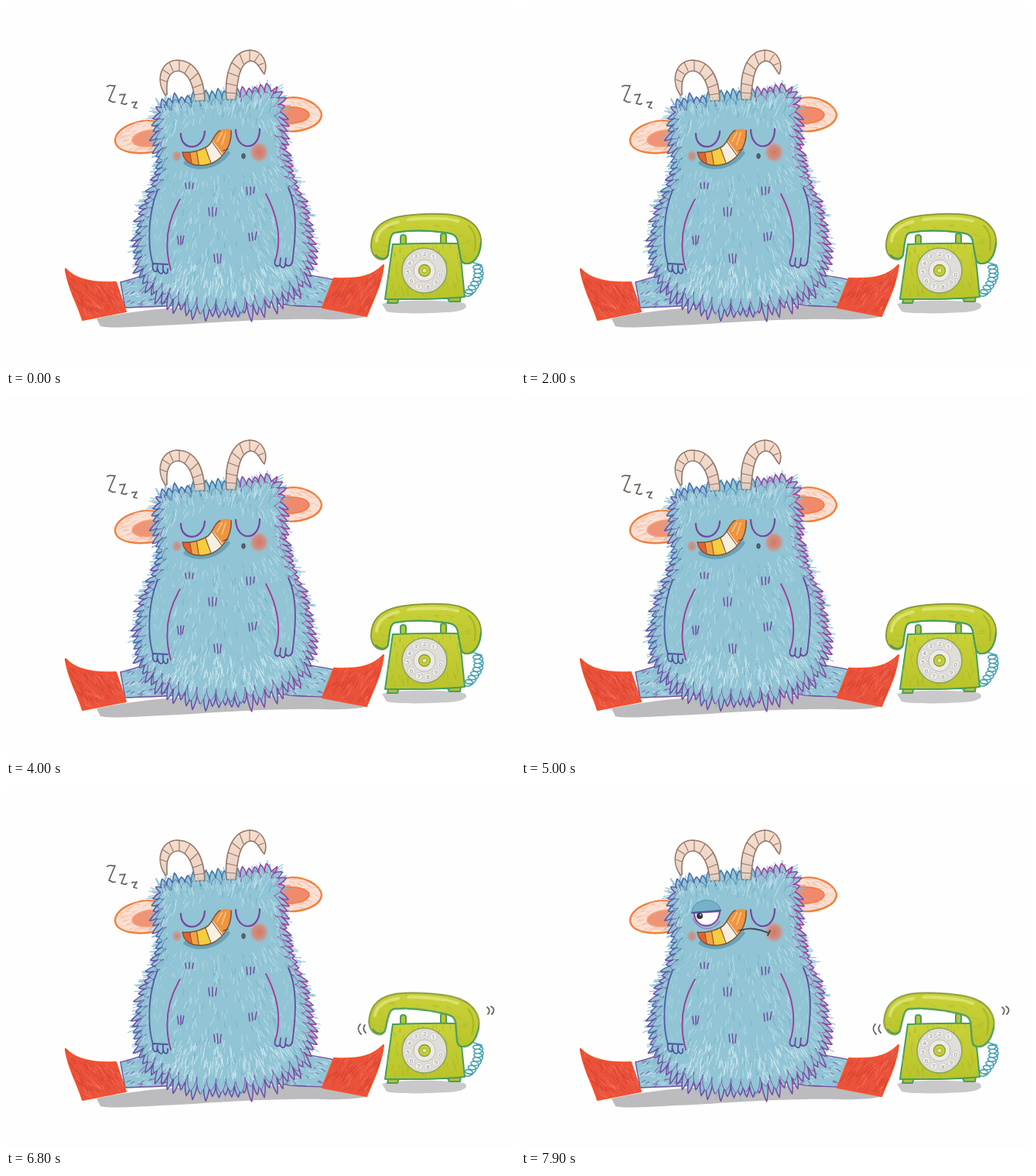
Recreate the animation shown at these times as an HTML page. Size 658 px wide and 468 px high, loop 8 s.

```html
<!DOCTYPE html>
<html lang="en">
<head>
<meta charset="utf-8">
<title>Sleepy monster</title>
<style>
html, body { margin: 0; width: 100%; height: 100%; overflow: hidden; background: #fefefe; }
svg { display: block; width: 100vw; height: 100vh; }
path { stroke-linecap: round; stroke-linejoin: round; }
.line { fill: none; }
.sleep, .ring, .handset, .rightShut, .rightOpen, .leftShut, .leftOpen, .dot, .gasp, .grimace {
  animation: 8s step-end infinite;
}
.sleep { animation-name: sleep; }
.ring { animation-name: ring; }
.handset { animation-name: shake; transform-origin: 543px 300px; }
.rightShut { animation-name: rightShut; }
.rightOpen, .gasp { animation-name: rightOpen; }
.leftShut { animation-name: leftShut; }
.leftOpen, .grimace { animation-name: leftOpen; }
.dot { animation-name: dot; }
@keyframes sleep { 0% { opacity: 1 } 88.75%, 100% { opacity: 0 } }
@keyframes ring { 0% { opacity: 0 } 80%, 100% { opacity: 1 } }
@keyframes shake {
  0%, 88.75%, 93.75%, 97.5% { transform: none }
  85%, 91.25%, 96.25%, 98.75%, 100% { transform: translate(-2px, -1px) rotate(5.5deg) }
}
@keyframes rightShut { 0%, 96.25%, 100% { opacity: 1 } 91.25% { opacity: 0 } }
@keyframes rightOpen { 0%, 96.25%, 100% { opacity: 0 } 91.25% { opacity: 1 } }
@keyframes leftShut { 0% { opacity: 1 } 96.25%, 100% { opacity: 0 } }
@keyframes leftOpen { 0% { opacity: 0 } 96.25%, 100% { opacity: 1 } }
@keyframes dot { 0% { opacity: 1 } 91.25%, 100% { opacity: 0 } }
</style>
</head>
<body>
<svg id="art" viewBox="0 0 658 468">
  <defs>
    <radialGradient id="blush">
      <stop offset="0" stop-color="#d9745f"/>
      <stop offset=".65" stop-color="#d48a7b" stop-opacity=".85"/>
      <stop offset="1" stop-color="#c9a5a0" stop-opacity="0"/>
    </radialGradient>
    <linearGradient id="horn" x2="0" y2="1">
      <stop offset="0" stop-color="#f6ddcd"/>
      <stop offset="1" stop-color="#e6cfc2"/>
    </linearGradient>
    <linearGradient id="lime" x2="0" y2="1">
      <stop offset="0" stop-color="#c9d238"/>
      <stop offset="1" stop-color="#b9c42b"/>
    </linearGradient>
    <clipPath id="noseClip"><use href="#nose"/></clipPath>
  </defs>

  <path fill="#bcbcbe" d="M117 404C150 397 190 391 240 389L400 387 468 401C440 408 400 404 370 405 300 406 250 411 200 413 165 415 135 417 122 414Z"/>
  <path fill="#c9c9cb" d="M486 385C510 379 570 380 592 384 600 389 592 395 570 396 540 398 505 398 492 395Z"/>

  <g stroke="#75509f" stroke-width="1.4" fill="#91c4d4">
    <path id="legL" d="M148 357C165 352 185 348 203 335L228 386C200 389 175 389 154 390Z"/>
    <path id="legR" d="M358 340C380 348 400 348 424 354L410 389C385 388 360 388 338 382Z"/>
  </g>
  <g fill="#ea523c" stroke="#f5512a" stroke-width="2.2">
    <path id="bootL" d="M77 340C88 352 107 359 142 357L155 395 99 406C93 385 80 365 77 340Z"/>
    <path id="bootR" d="M488 335C475 348 460 354 424 352L409 390 466 401C474 380 485 362 488 335Z"/>
  </g>

  <g stroke="#f0803c" stroke-width="2.4">
    <path id="earL" fill="#fae0d3" d="M193 149C172 145 142 157 141 174 142 189 170 194 196 187Z"/>
    <path id="earR" fill="#fae0d3" d="M355 121C380 112 407 127 408 141 406 157 378 165 357 161Z"/>
    <path fill="#f09478" stroke="#f2a47f" stroke-width="1.5" d="M192 160C178 160 163 166 163 174 165 182 180 183 194 181Z"/>
    <path fill="#f08a6a" stroke="#f07c48" stroke-width="1.8" d="M356 131C372 129 391 132 392 141 390 150 372 153 357 152Z"/>
  </g>

  <path id="body" fill="#91c4d4" d="M200 130C225 121 300 120 345 108C356 122 356 150 355 172C358 200 372 225 380 250C390 280 396 315 390 338C380 368 330 387 275 387C225 387 185 365 175 338C170 310 172 280 182 255C196 225 204 205 199 180C193 160 196 140 200 130Z"/>
  <g id="fur"></g>

  <g fill="url(#horn)" stroke="#94786a" stroke-width="1.6">
    <path d="M257 122C256 95 247 71 222 70 201 70 192 95 206 115 209 116 208 113 208 110 207 93 213 83 224 84 237 87 243 105 244 123Z"/>
    <path d="M285 121C282 90 290 58 316 57 333 58 339 75 334 88 329 84 326 71 316 71 300 74 299 102 297 121Z"/>
    <path class="line" stroke-width="1.1" d="M200 95l8 3M202 82l9 6M211 73l5 11M224 70l0 14M238 75l-7 12M248 87l-10 9M254 101l-13 5M256 113l-13 2M333 74l-8 3M327 63l-6 9M315 57l0 14M302 62l5 13M292 73l11 9M287 86l13 5M285 100l13 3M285 112l13 1"/>
  </g>
  <path class="line" stroke="#9fd0df" stroke-width="1.4" d="M243 127l1 -8M248 127l0 -9M253 127l1 -8M258 126l2 -9M284 125l-1 -8M289 125l1 -9M294 125l1 -8M299 124l1 -7"/>

  <g class="line" stroke-width="1.8">
    <path fill="#91c4d4" stroke="none" d="M196 238C184 270 184 310 190 340L213 345C207 310 210 280 224 250Z"/>
    <path fill="#91c4d4" stroke="none" d="M336 243C352 280 355 310 348 335L369 337C374 310 378 270 366 237Z"/>
    <g id="armFur"></g>
    <path stroke="#4f5aa3" d="M196 238C183 270 183 310 190 334"/>
    <path stroke="#9a3a97" d="M225 250C207 280 205 312 213 341"/>
    <path stroke="#a83596" d="M336 243C353 275 356 305 348 329"/>
    <path stroke="#6a48a0" d="M365 235C379 265 373 310 370 332"/>
    <path stroke="#51519c" d="M190 333C188 340 192 345 195 343L196 334M196 340C198 348 203 347 203 342V334M203 341C205 348 210 347 209 340M190 333L209 334"/>
    <path stroke="#6d479c" d="M348 328C346 335 350 338 354 335L355 326M354 334C356 340 361 339 361 334L362 326M361 333C364 338 369 336 370 331"/>
    <path stroke="#734a9e" stroke-width="1.5" d="M232 229l1 7M237 228l0 8M242 229l-1 7M311 234l1 10M316 234l0 10M321 234l-1 8M262 261l1 10M267 260l0 12M272 261l-1 10M222 298l1 10M226 297l0 12M230 297l-2 10M314 294l1 10M318 293l1 10M324 292l-2 10M269 321l1 10M273 320l1 13M278 321l-1 11"/>
  </g>

  <ellipse cx="327" cy="189" rx="13" ry="14" fill="url(#blush)"/>
  <ellipse cx="221" cy="194" rx="7" ry="8" fill="url(#blush)" opacity=".75"/>
  <path class="line" stroke="#5b95ad" stroke-width="5" opacity=".7" d="M232 203C250 214 275 207 287 190"/>
  <path id="nose" fill="#ef9440" d="M228 189C237 190 250 188 261 181 268 175 270 163 277 161 282 158 289 158 291 161 292 178 284 194 267 203 250 209 231 207 228 189Z"/>
  <g clip-path="url(#noseClip)">
    <path fill="#e8602e" d="M224 184H238L241 210H226Z"/>
    <path fill="#f2a33c" d="M237 184L246 186 250 212 240 210Z"/>
    <path fill="#f6cd3e" d="M246 184L257 180 266 208 249 211Z"/>
    <path fill="#f7efe0" d="M257 179L267 174 282 194 265 208Z"/>
    <path class="line" stroke="#8c5736" stroke-width="1.2" d="M237 186L241 208M246 185L250 210M257 181L266 206M266 175L281 196"/>
    <path class="line" stroke="#f7bd79" stroke-width="2" d="M279 164L273 175M284 164L279 179"/>
  </g>
  <path class="line" stroke="#7a5138" stroke-width="1.5" d="M228 189C237 190 250 188 261 181 268 175 270 163 277 161M228 189C231 207 250 209 267 203 284 194 292 178 291 161"/>
  <path class="line" stroke="#4c4750" stroke-width="1.3" d="M281 187L287 185"/>

  <path class="line leftShut" stroke="#7545a0" stroke-width="2.2" d="M226 165C226 188 255 188 257 162"/>
  <path class="line rightShut" stroke="#7c43a0" stroke-width="2.2" d="M297 160C298 189 328 188 328 159"/>
  <g class="rightOpen">
    <path fill="#76b1c8" stroke="#4f94b5" d="M293 158C294 138 326 136 329 155Z"/>
    <path fill="#fdfdfd" stroke="#b04aa4" stroke-width="2.2" d="M297 159C296 183 327 184 328 156Z"/>
    <path class="line" stroke="#b04aa4" stroke-width="1.2" opacity=".7" d="M295 168C302 185 320 186 328 171"/>
    <path class="line" stroke="#4a6a94" stroke-width="2" d="M293 159L329 155"/>
    <circle cx="319" cy="162" r="4.2" fill="#33323a"/>
    <circle cx="320.5" cy="160.5" r="1" fill="#fff"/>
  </g>
  <g class="leftOpen">
    <path fill="#76b1c8" stroke="#4f94b5" d="M221 163C222 144 254 142 258 160Z"/>
    <path fill="#fdfdfd" stroke="#8a4aa4" stroke-width="2.2" d="M224 164C224 186 255 187 257 162Z"/>
    <path class="line" stroke="#a14ba4" stroke-width="1.2" opacity=".7" d="M222 171C230 188 248 188 257 175"/>
    <path class="line" stroke="#4a5a94" stroke-width="2" d="M221 164L258 161"/>
    <circle cx="231" cy="168" r="4" fill="#33323a"/>
    <circle cx="232" cy="166.5" r="1" fill="#fff"/>
  </g>
  <ellipse class="dot" cx="307" cy="194" rx="2.2" ry="3.2" fill="#5c6470" stroke="#424650"/>
  <ellipse class="gasp" cx="308" cy="193" rx="5" ry="9" fill="#484b56" stroke="#35373f"/>
  <path class="line grimace" stroke="#41404a" stroke-width="1.8" d="M284 187C294 182 309 185 320 190M322 187L319 193"/>

  <path id="cord" class="line" stroke="#4ba3b5" stroke-width="1.6"/>
  <g stroke="#45a060" stroke-width="2">
    <path fill="#b5c02b" d="M495 376L493 384H506L508 378ZM571 378L573 382 587 382 588 375Z"/>
    <path fill="#b9c430" d="M510 309V299C510 295 517 295 517 299V309ZM562 309V297C562 293 569 293 569 297V308Z"/>
    <path id="phone" fill="url(#lime)" d="M500 308C530 307 560 306 586 307L593 376C560 380 520 379 490 379Z"/>
  </g>
  <circle cx="541" cy="342" r="29" fill="#e1deda" stroke="#8da55a" stroke-width="1.6"/>
  <circle cx="541" cy="342" r="14" fill="#eceae6" stroke="#bdbab4"/>
  <g id="dial" font-family="'Open Sans', sans-serif" font-size="8" text-anchor="middle" fill="#99979a"></g>
  <circle cx="541" cy="342" r="7.5" fill="#c3d036" stroke="#8b9a3a" stroke-width="1.3"/>
  <circle cx="541" cy="342" r="3" fill="#e9e4a0" stroke="#a2a643"/>

  <g class="handset">
    <path id="handle" fill="url(#lime)" stroke="#8a9a3c" stroke-width="2" d="M472 310C472 286 488 277 505 273 530 268 570 267 586 272 606 278 615 292 614 306 613 322 606 332 597 333 589 334 588 328 587 322L584 305C583 297 578 294 568 293 545 290 520 290 503 293 498 294 497 300 496 306L494 321C492 333 472 329 472 310Z"/>
    <path class="line" stroke="#45a060" stroke-width="2" d="M614 306C613 322 606 332 597 333 589 334 588 328 587 322L584 305C583 297 578 294 568 293 545 290 520 290 503 293 498 294 497 300 496 306L494 321C493 328 483 328 478 322"/>
    <path class="line" stroke="#e1e67b" stroke-width="4" opacity=".8" d="M479 304C480 291 490 283 507 279M520 276C545 274 570 274 584 278"/>
    <path class="line" stroke="#9fa824" stroke-width="2" opacity=".7" d="M598 284C606 291 608 303 606 316"/>
  </g>

  <path class="line sleep" stroke="#6c645f" stroke-width="1.8" d="M131 104C134 101 138 104 141 103L133 122C136 122 137 126 141 124M147 115C150 113 152 116 154 114L149 126C151 125 153 129 156 126M163 125C165 123 167 126 169 124L165 131 169 132"/>
  <path class="line ring" stroke="#6c645f" stroke-width="1.8" d="M458 308C454 312 455 317 459 321M464 309C461 313 462 316 465 319M622 286C625 288 626 291 623 295M627 285C631 287 632 291 628 295"/>
</svg>
<script>
const $ = id => document.getElementById(id);
const NS = 'http://www.w3.org/2000/svg';
let seed = 11;
const rnd = () => {
  seed = (seed * 16807) % 2147483647;
  return seed / 2147483647;
};
const between = (a, b) => a + (b - a) * rnd();
const xy = (x, y) => x.toFixed(1) + ' ' + y.toFixed(1);

function add(parent, name, attrs, before = null) {
  const el = document.createElementNS(NS, name);
  for (const key in attrs) el.setAttribute(key, attrs[key]);
  parent.insertBefore(el, before);
  return el;
}

const probe = $('art').createSVGPoint();
function inside(shape, x, y) {
  probe.x = x;
  probe.y = y;
  return shape.isPointInFill(probe);
}

// Short pencil strokes scattered inside a shape.
function hatch(shape, n, stroke, width, len, angle, accept = () => true, host) {
  const box = shape.getBBox();
  let d = '';
  for (let i = 0; i < n; i++) {
    const x = between(box.x, box.x + box.width), y = between(box.y, box.y + box.height);
    const a = angle(x, y) + between(-.3, .3), l = len * between(.5, 1.1);
    const dx = Math.cos(a) * l, dy = Math.sin(a) * l;
    if (inside(shape, x, y) && inside(shape, x + dx, y + dy) && accept(x, y))
      d += `M${xy(x, y)}l${xy(dx, dy)}`;
  }
  const attrs = { d, stroke, fill: 'none', 'stroke-width': width, opacity: .75 };
  host ? add(host, 'path', attrs) : add(shape.parentNode, 'path', attrs, shape.nextSibling);
}

const body = $('body'), fur = $('fur'), total = body.getTotalLength();

function edge(s) {
  const p = body.getPointAtLength((s + total) % total);
  const q = body.getPointAtLength((s + 1 + total) % total);
  const l = Math.hypot(q.x - p.x, q.y - p.y) || 1;
  return { x: p.x, y: p.y, nx: (q.y - p.y) / l, ny: (p.x - q.x) / l };
}

function hue({ x, y }) {
  if (y < 135 && x > 240 && x < 300) return '#4379ac';
  if (x > 305) return y < 330 ? '#9d3f9f' : '#83469f';
  if (y > 345) return '#7349a3';
  return rnd() < .6 ? '#6650a5' : '#4c66aa';
}

// Pointed locks of hair along the outline.
function locks(step, inset, size, width) {
  const paths = {};
  for (let s = 0; s < total; s += step) {
    const a = edge(s), m = edge(s + step / 2), b = edge(s + step);
    const droop = m.y < 135 ? -.15 : .65;
    const l = size * between(.65, 1.3) * (m.y > 355 ? 1.15 : 1);
    const at = (p, k) => xy(p.x - p.nx * inset + m.nx * l * k, p.y - p.ny * inset + (m.ny + droop) * l * k);
    const key = hue(m);
    paths[key] = (paths[key] || '') + `M${at(a, 0)}Q${at(a, .6)} ${at(m, 1)}Q${at(b, .6)} ${at(b, 0)}`;
  }
  for (const key in paths)
    add(fur, 'path', { d: paths[key], fill: '#91c4d4', stroke: key, 'stroke-width': width });
}

// Loose pale hairs that stick out past the outline.
function wisps(n) {
  let d = '';
  for (let i = 0; i < n; i++) {
    const p = edge(rnd() * total), l = between(7, 13), k = between(-4, 2);
    d += `M${xy(p.x + p.nx * k, p.y + p.ny * k)}l${xy(p.nx * l + between(-3, 3), (p.ny + (p.y < 140 ? 0 : .4)) * l)}`;
  }
  add(fur, 'path', { d, fill: 'none', stroke: '#82bdd3', 'stroke-width': 1.3, opacity: .85 });
}

const flow = (x, y) => y < 145 ? -Math.PI / 2 + (x - 275) * .007 : Math.PI / 2 - (x - 275) * .007;
const inFace = (x, y) => Math.hypot((x - 276) / 69, (y - 181) / 37) < 1;
const coat = (x, y) => !inFace(x, y) && rnd() < .12 + .9 * Math.hypot((x - 275) / 125, (y - 270) / 135) ** 2;

wisps(330);
locks(8, 2, 11, 1.5);
locks(13, 8, 9, .8);
hatch(body, 1800, '#c4e5ee', 1, 10, flow, coat, fur);
hatch(body, 700, '#6cafc7', 1, 9, flow, coat, fur);
hatch(body, 900, '#e2f3f7', 1, 12, flow, (x, y) => y > 335 && y < 372, fur);
hatch(body, 170, '#b7dde9', .9, 8, flow, (x, y) => !inFace(x, y), fur);
hatch(body, 900, '#b7dde9', .8, 7, () => 1.57,
  (x, y) => y > 245 && y < 325 && (x < 208 && x > 190 || x > 355 && x < 370), $('armFur'));

for (const id of ['legL', 'legR']) {
  const left = id === 'legL';
  hatch($(id), 60, '#7a50a2', 1.1, 6, () => left ? 2.6 : .5);
  hatch($(id), 90, '#c4e4ee', 1, 8, () => left ? 2.8 : .3);
}
for (const [id, a] of [['bootL', .9], ['bootR', 2.2]]) {
  hatch($(id), 150, '#d63f2d', 1, 11, () => a);
  hatch($(id), 80, '#f47a5e', 1, 9, () => a);
}
hatch($('earL'), 90, '#f4b79c', .9, 7, () => 2.8);
hatch($('earR'), 90, '#f4b79c', .9, 7, () => .3);
hatch($('phone'), 90, '#abb626', 1, 9, () => 1.5);
hatch($('handle'), 60, '#b0ba26', 1, 9, () => .1);

for (let i = 0; i < 10; i++) {
  const a = -1 + i * -.56, x = 541 + 21.5 * Math.cos(a), y = 342 + 21.5 * Math.sin(a);
  add($('dial'), 'circle', { cx: x, cy: y, r: 4.8, fill: '#eeece8', stroke: '#c8c5bf', 'stroke-width': .8 });
  add($('dial'), 'text', { x, y: y + 2.8 }).textContent = (i + 1) % 10;
}

let coil = 'M602 331';
for (let i = 0; i <= 100; i++) {
  const t = i / 100, a = t * 7 * 2 * Math.PI;
  coil += 'L' + xy(609 + 3 * Math.sin(t * 4) - 9 * t * t + 6 * Math.cos(a), 335 + 37 * t + 4 * Math.sin(a));
}
$('cord').setAttribute('d', coil + 'Q596 378 592 373');
</script>
</body>
</html>
```
